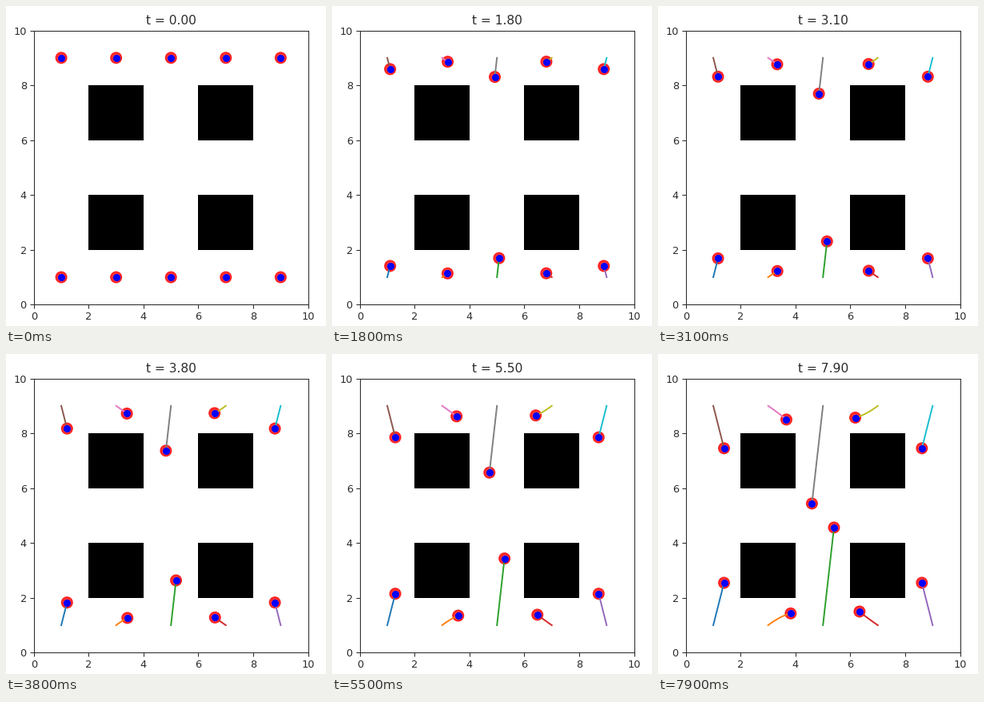
Write a matplotlib script that moves like this. It is 400 px wide and 400 px high and loops after 8000 ms.

```python
import numpy as np
import matplotlib.pyplot as plt
from matplotlib.animation import FuncAnimation
from matplotlib.patches import Circle, Rectangle

SIZE, DPI = 400, 93
FRAMES, STEP = 80, 0.1
INK = "#2b2b2b"

plt.rcParams.update({
    "font.family": "DejaVu Sans", "font.size": 10, "axes.titlesize": 12,
    "axes.edgecolor": INK, "xtick.color": INK, "ytick.color": INK,
    "text.color": INK, "lines.linewidth": 1.5,
})


def paths(t):
    """Positions of all robots, shape (10, len(t), 2)."""
    climb = t * (0.2385 - 0.0054 * t)
    ramp = 0.47 * (t - 0.32 * (1 - np.exp(-t / 0.32)))
    moves = [
        (0.254 * climb, climb),
        (t * (0.112 - 0.001 * t), t * (0.0845 - 0.0038 * t)),
        (0.113 * ramp, ramp),
        (-t * (0.1215 - 0.0047 * t), t * (0.0845 - 0.0027 * t)),
        (-0.254 * climb, climb),
    ]
    lower = [np.column_stack([1 + 2 * i + dx, 1 + dy])
             for i, (dx, dy) in enumerate(moves)]
    # The upper row is the lower one turned half way round the centre.
    upper = [10 - p for p in reversed(lower)]
    return np.array(lower + upper)


track = paths(np.arange(FRAMES) * STEP)

fig = plt.figure(figsize=(SIZE / DPI, SIZE / DPI), dpi=DPI, facecolor="white")
ax = fig.add_axes([34.8 / SIZE, 26.7 / SIZE, 342.8 / SIZE, 342.8 / SIZE])
ax.set(xlim=(0, 10), ylim=(0, 10),
       xticks=range(0, 11, 2), yticks=range(0, 11, 2))
title = ax.set_title("t = 0.00")

for x in (2, 6):
    for y in (2, 6):
        ax.add_patch(Rectangle((x, y), 2, 2, fc="black", lw=0))

bodies = [ax.add_patch(Circle(p[0], 0.2, color="red", alpha=0.8, lw=1))
          for p in track]
trails = [ax.plot([], [], color=f"C{i}")[0] for i in range(len(track))]
dots, = ax.plot([], [], "o", color="blue", ms=6)


def draw(i):
    title.set_text(f"t = {i * STEP:.2f}")
    for path, body, trail in zip(track, bodies, trails):
        body.center = path[i]
        trail.set_data(*path[:i + 1].T)
    dots.set_data(*track[:, i].T)
    return [title, dots, *bodies, *trails]


anim = FuncAnimation(fig, draw, frames=FRAMES, interval=100,
                     repeat=True, repeat_delay=0, blit=False)
plt.show()
```
